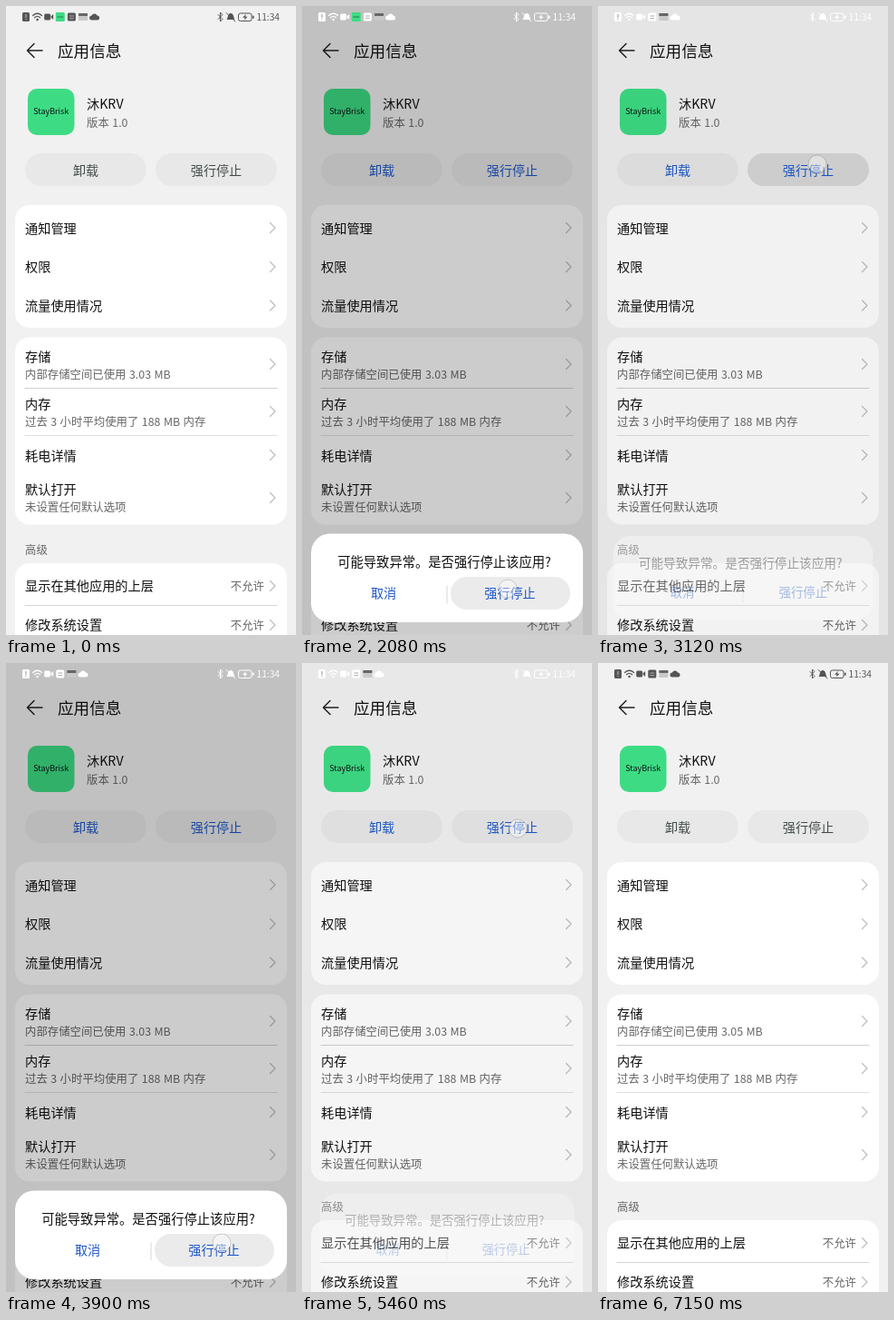
An HTML page for the animation above (8 s loop, 320x692 px).

```html
<!DOCTYPE html>
<html lang="zh-CN">
<head>
<meta charset="utf-8">
<style>
  html, body { margin: 0; width: 100%; height: 100%; overflow: hidden; background: #f1f1f1; }
  svg { display: block; width: 100%; height: 100%; }
  text { font-family: "Noto Sans CJK SC", "Noto Sans CJK", "Noto Sans", sans-serif; word-spacing: .7px; }
  .title { font-weight: 500; }
  .line { fill: none; stroke-linecap: round; stroke-linejoin: round; }
</style>
</head>
<body>
<svg id="stage" viewBox="0 0 320 692"></svg>
<script>
const LOOP = 8000, STEP = 130, LAST_CHANGE = 7150;
const BLUE = '#1d57c8', IDLE = '#434c48', GREEN = '#3ddc84';

// Each round: finger down on the page, dialog opens, finger down in the dialog, dialog closes.
const rounds = [
  { down: 1040, open: 1040, press: 1690, close: 2080, closed: 2340, tap: [238, 180], confirm: [227, 641] },
  { down: 2860, open: 2990, press: 3900, close: 4270, closed: 4660, tap: [242, 174], confirm: [238, 638] },
  { down: 4810, open: 5350, press: 6500, close: 6760, closed: 7150, tap: [238, 182], confirm: [243, 639] }
];

// Text is placed by the vertical centre of its glyphs.
const text = (x, cy, size, str, { fill = '#111', anchor = 'start', cls = '', id = '' } = {}) =>
  `<text id="${id}" class="${cls}" x="${x}" y="${cy + size * .38}" font-size="${size}" fill="${fill}" text-anchor="${anchor}">${str}</text>`;
const title = (cy, str) => text(21, cy, 14.2, str, { cls: 'title' });
const note = (cy, str, id) => text(21, cy, 12.4, str, { fill: '#666', id });
const value = cy => text(285, cy, 12.4, '不允许', { fill: '#666', anchor: 'end' });
const box = (x, y, w, h, r, fill, id = '') =>
  `<rect id="${id}" x="${x}" y="${y}" width="${w}" height="${h}" rx="${r}" fill="${fill}"/>`;
const line = (d, stroke, width, id = '') => `<path id="${id}" class="line" d="${d}" stroke="${stroke}" stroke-width="${width}"/>`;
const chevron = cy => line(`M291.5 ${cy - 5.5}l5.5 5.5l-5.5 5.5`, '#bdbdbd', 1.2);
const divider = (y, color) => line(`M21 ${y}H299`, color, 1);
const label = (x, cy, str, fill, id) => text(x, cy, 14.1, str, { fill, anchor: 'middle', cls: 'title', id });
const slot = (id, art) => `<g id="${id}">${art}</g>`;

const page = `
  <rect width="320" height="692" fill="#f1f1f1"/>
  ${line('M40 49H23.5M31 41.5L23.5 49L31 56.5', '#222', 1.5)}
  ${text(57, 49.5, 17.6, '应用信息', { cls: 'title' })}
  ${box(24, 91, 51.5, 51, 10, GREEN)}
  ${text(49.7, 116, 9, 'StayBrisk', { anchor: 'middle' })}
  ${text(89, 107.5, 14.2, '沐KRV', { cls: 'title' })}
  ${text(89, 128, 12.4, '版本 1.0', { fill: '#666' })}
  ${box(21, 162, 134, 36, 18, '#e8e8e8')}
  ${box(165, 162, 134, 36, 18, '#e8e8e8', 'stopButton')}
  ${label(88, 180.5, '卸载', IDLE, 'uninstall')}
  ${label(232, 180.5, '强行停止', IDLE, 'stop')}
  ${box(10, 219, 300, 135, 16, '#fff')}
  ${title(244.5, '通知管理')}${title(287, '权限')}${title(329.5, '流量使用情况')}
  ${box(10, 364.5, 300, 206, 16, '#fff')}
  ${title(385.5, '存储')}${note(405.5, '', 'storage')}
  ${divider(420.5, '#d0d0d0')}
  ${title(437.5, '内存')}${note(457.5, '过去 3 小时平均使用了 188 MB 内存')}
  ${divider(472.5, '#dedede')}
  ${title(494.3, '耗电详情')}
  ${title(532, '默认打开')}${note(551.7, '未设置任何默认选项')}
  ${note(598, '高级')}
  ${box(10, 613, 300, 100, 16, '#fff')}
  ${title(638, '显示在其他应用的上层')}${value(638.3)}
  ${divider(659.5, '#d4d4d4')}
  ${title(681, '修改系统设置')}${value(681)}
  ${[244, 287, 329.5, 394, 446, 494, 541, 638, 681].map(chevron).join('')}`;

// Status glyphs are drawn around the origin and inherit the bar colour.
const INK = 'currentColor';
const status = `
  <g id="status">
    ${slot('sim', box(-4, -5, 8, 10, 1.5, INK) + line('M0 -2.5V.5M0 2.6V2.7', '#aaa', 1.3))}
    ${slot('wifi', line('M-5 -1.5Q0 -6 5 -1.5M-3 .8Q0 -2 3 .8', INK, 1.2) + `<circle cy="3" r="1.3" fill="${INK}"/>`)}
    ${slot('camera', box(-5, -3.5, 7, 7, 1.5, INK) + `<path d="M2.5 -.8L5 -3V3L2.5 .8Z" fill="${INK}"/>`)}
    ${slot('app', box(-5, -5, 10, 10, 1, GREEN) + line('M-3 0H3', '#247a4b', 1))}
    ${slot('tile', box(-4.5, -4.5, 9, 9, 1.5, INK) + line('M-2 -1H2M-2 1.7H2', '#aaa', 1))}
    ${slot('card', box(-5, -4, 10, 8, .5, '#c9c9c9') + box(-5, -4, 10, 3, .5, '#666'))}
    ${slot('cloud', `<path d="M-3 3.5a2.5 2.5 0 0 1 0-5a3.2 3.2 0 0 1 6 0a2.5 2.5 0 0 1 0 5Z" fill="${INK}"/>`)}
    ${line('M234 9.5L239 14.5L236.5 17V7L239 9.5L234 14.5', INK, 1)}
    <path d="M243.5 15C245 13.5 244.4 8 248 8S251 13.5 252.5 15Z" fill="${INK}"/>
    ${line('M243 7.5L253 17', INK, 1)}
    <rect x="256.5" y="8" width="14.5" height="8.5" rx="2" fill="none" stroke="${INK}"/>
    ${box(272, 10.5, 1.5, 3.5, .7, INK)}
    <path d="M264.8 9L261 12.8H263.5L262.8 15.6L266.6 11.8H264.1Z" fill="${INK}"/>
    ${text(302, 12.3, 10.2, '11:34', { fill: INK, anchor: 'end' })}
  </g>`;

const dialog = `
  <g id="dialog">
    ${box(10, 580.5, 300, 97.5, 21, '#fff')}
    ${text(157, 612, 14.3, '可能导致异常。是否强行停止该应用?', { anchor: 'middle' })}
    ${line('M160 638V657', '#d8d8d8', 1)}
    ${box(164, 628, 132, 36, 18, '#ebebeb', 'confirmButton')}
    ${label(90, 646, '取消', BLUE)}
    ${label(229.5, 646, '强行停止', BLUE)}
  </g>`;

const stage = document.getElementById('stage');
stage.innerHTML = page + '<rect id="scrim" width="320" height="692"/>' + status + dialog +
  '<circle id="touch" r="10" fill="#fff" fill-opacity=".4" stroke="#000" stroke-opacity=".16"/>';

const parts = {};
stage.querySelectorAll('[id]').forEach(el => { if (el.id) parts[el.id] = el; });
const set = (name, attrs) => Object.entries(attrs).forEach(([key, val]) => parts[name].setAttribute(key, val));
const show = (name, on) => set(name, { visibility: on ? 'visible' : 'hidden' });
const smooth = (t, from, to) => {
  const x = Math.min(1, Math.max(0, (t - from) / (to - from)));
  return x * x * (3 - 2 * x);
};

function drawStatus(t, light) {
  const icons = ['sim', 'wifi', 'camera', 'tile', 'card', 'cloud'];
  const running = t <= 2080 || (t >= 6110 && t <= 6760);
  if (running) icons.splice(t <= 2080 ? 3 : 2, 0, 'app');
  icons.forEach((name, i) => set(name, { transform: `translate(${22 + 12.6 * i} 12)` }));
  show('app', running);
  set('status', { color: light ? '#fff' : '#555' });
}

function draw(t) {
  const round = rounds.find(r => t >= r.down && t < r.closed);
  let shown = 0, alpha = 0, scale = 1, touch = null;
  let tapped = false, confirming = false, closing = false;

  if (round) {
    closing = t > round.close;
    shown = closing ? 1 - smooth(t, round.close, round.closed) : smooth(t, round.open, round.open + 390);
    alpha = closing ? shown * .82 : Math.min(1, shown * 1.4);
    scale = closing ? 1 - .14 * (1 - shown) : Math.min(1, .88 + .29 * shown);
    tapped = t < round.down + 390;
    confirming = t >= round.press;
    if (t < round.open + 140) touch = round.tap;
    else if (confirming && t < round.close + 160) touch = round.confirm;
  }

  set('scrim', { 'fill-opacity': .2 * shown });
  set('dialog', { opacity: alpha, transform: `translate(160 629) scale(${scale}) translate(-160 -629)` });
  show('confirmButton', confirming);
  set('stopButton', { fill: tapped ? '#d8d8d8' : '#e8e8e8' });
  for (const name of ['uninstall', 'stop']) set(name, { fill: round ? BLUE : IDLE });
  parts.storage.textContent = `内部存储空间已使用 ${t < LAST_CHANGE ? '3.03' : '3.05'} MB`;
  show('touch', touch);
  if (touch) set('touch', { cx: touch[0], cy: touch[1] });
  drawStatus(t, shown > 0 && !closing);
}

function tick() {
  const t = performance.now() % LOOP;
  draw(Math.min(LAST_CHANGE, Math.floor(t / STEP) * STEP));
  requestAnimationFrame(tick);
}
tick();
</script>
</body>
</html>
```
